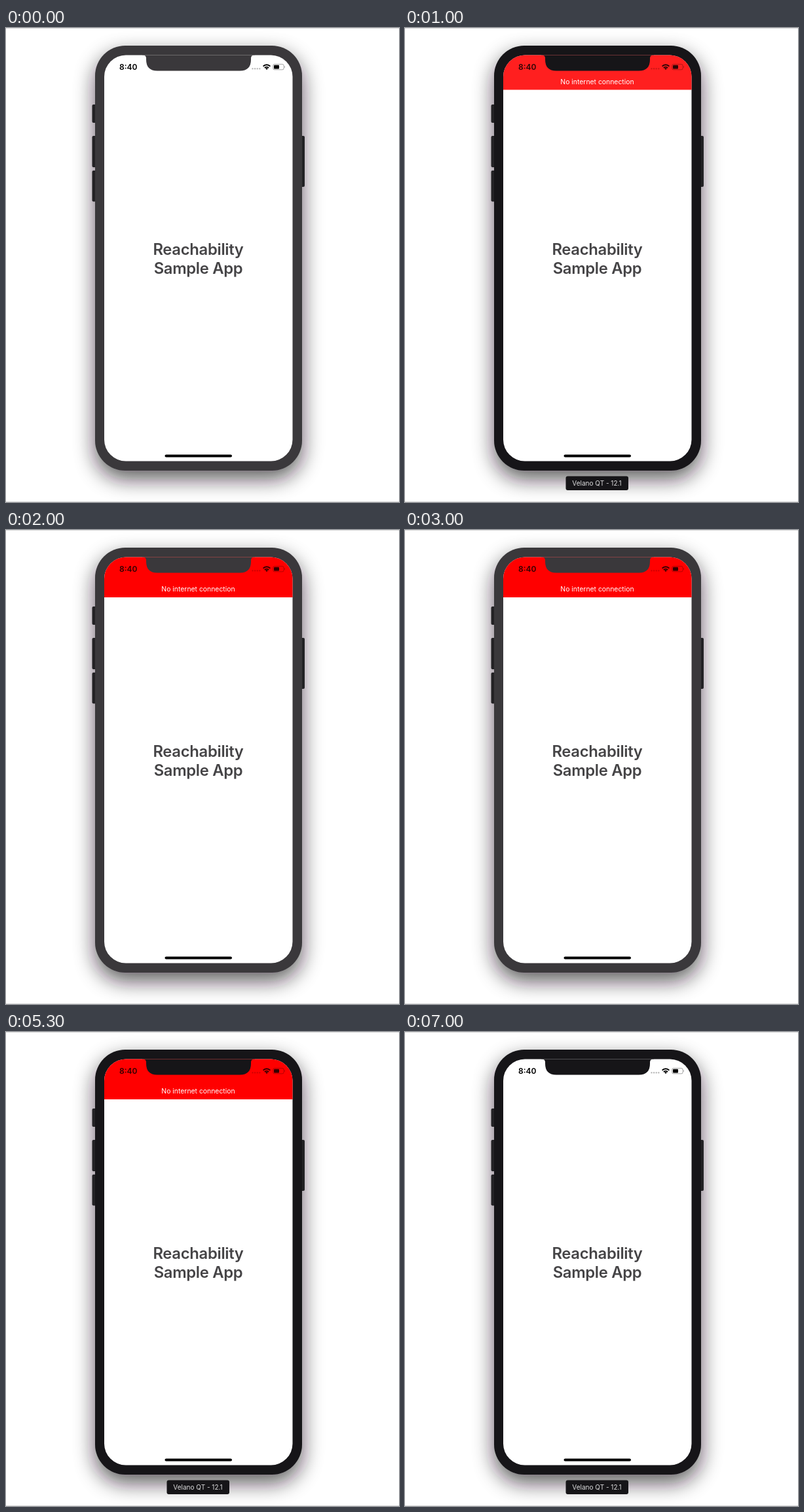
An HTML page that plays this animation: 600 px wide and 725 px high, repeating every 7.7 s.

```html
<!DOCTYPE html>
<html lang="en">
<head>
<meta charset="utf-8">
<title>Connection banner</title>
<style>
  html, body { margin: 0; width: 100%; height: 100%; overflow: hidden; background: #fff; }
  svg { display: block; width: 600px; height: 725px; }
  text { font-family: Inter, Roboto, sans-serif; }
  .mid { text-anchor: middle; }
  .title { font-size: 23.8px; font-weight: 600; letter-spacing: -.3px; fill: #454446; }
</style>
</head>
<body>
<svg viewBox="0 0 600 725">
  <defs>
    <clipPath id="screen"><rect x="150" y="41.5" width="287.5" height="621" rx="33"/></clipPath>
    <filter id="blur" x="-30%" y="-20%" width="160%" height="140%"><feGaussianBlur stdDeviation="16"/></filter>
  </defs>

  <path d="M0 .5H600M0 724.5H600" stroke="#dcdcdc"/>
  <rect x="136" y="40" width="316" height="650" rx="46" fill="#120c18" opacity=".68" filter="url(#blur)"/>

  <g fill="#232225">
    <rect x="131.5" y="117" width="8" height="28" rx="2"/>
    <rect x="131.5" y="165" width="8" height="48" rx="2"/>
    <rect x="131.5" y="218" width="8" height="47.5" rx="2"/>
    <rect x="448" y="165" width="8" height="78" rx="2"/>
  </g>

  <rect class="shell" x="136" y="27" width="316" height="650" rx="46"/>

  <g clip-path="url(#screen)">
    <rect x="150" y="41" width="288" height="622" fill="#fff"/>
    <text class="mid title" x="293.5" y="346.5">Reachability</text>
    <text class="mid title" x="293.5" y="375.5">Sample App</text>
    <rect x="242.5" y="652.5" width="102.5" height="4" rx="2"/>

    <g id="banner">
      <rect x="150" y="23" width="288" height="80" fill="#f00"/>
      <text class="mid" x="293.5" y="94" font-size="10.4" fill="#fff">No internet connection</text>
    </g>

    <g id="status">
      <text x="173" y="64" font-size="12" font-weight="600">8:40</text>
      <path id="dots" d="M376.5 62.2h12" stroke="#bbb" stroke-width="2.5" stroke-linecap="round" stroke-dasharray="0 3.6"/>
      <g fill="none" stroke="#000" stroke-width="1.9">
        <path d="M392.6 58.6a7.4 7.4 0 0 1 10.8 0"/>
        <path d="M394.9 61a4.4 4.4 0 0 1 6.2 0"/>
      </g>
      <path d="M398 64l-1.9-2.1a2.7 2.7 0 0 1 3.8 0z"/>
      <rect x="407.7" y="55.4" width="16.4" height="8.4" rx="2.2" fill="none" stroke="#000" stroke-opacity=".4" stroke-width=".9"/>
      <rect x="409" y="56.7" width="8" height="5.8" rx="1"/>
      <path d="M425.2 58.2a1.6 1.6 0 0 1 0 2.8z" opacity=".5"/>
    </g>
    <path class="shell" d="M208 41.5h1q5 0 5 5v2q0 17 17 17H357q17 0 17-17v-2q0-5 5-5h1V40H208z"/>
  </g>

  <g id="tag">
    <rect x="245.5" y="685.5" width="95.5" height="21.5" rx="3" fill="#161518"/>
    <text class="mid" x="293" y="700" font-size="10" fill="#dededf">Velano QT - 12.1</text>
  </g>
</svg>
<script>
  const LOOP = 7700, STEP = 100, TRAVEL = 70;
  const $ = id => document.getElementById(id);
  const shells = document.querySelectorAll('.shell');

  // Critically damped spring, 0 to 1
  const spring = x => 1 - (1 + x) * Math.exp(-x);

  function shown(t) {
    if (t < 700 || t >= 7000) return 0;
    return t < 6360 ? spring((t - 571) * .0085) : 1 - spring((t - 6356) * .0095);
  }

  function draw(now) {
    const t = Math.floor(now % LOOP / STEP) * STEP;
    const p = shown(t);
    const focused = t >= 200 && t < 1800 || t >= 3400;

    shells.forEach(s => s.setAttribute('fill', focused ? '#161518' : '#3a383b'));
    $('tag').setAttribute('visibility', focused ? 'visible' : 'hidden');
    $('banner').setAttribute('transform', `translate(0 ${(p - 1) * TRAVEL})`);
    $('banner').setAttribute('opacity', p);
    $('status').setAttribute('opacity', 1 - .2 * p);
    $('dots').setAttribute('stroke', `rgb(${187 + 13 * p} ${187 * (1 - p)} ${187 * (1 - p)})`);
    requestAnimationFrame(draw);
  }
  requestAnimationFrame(draw);
</script>
</body>
</html>
```
